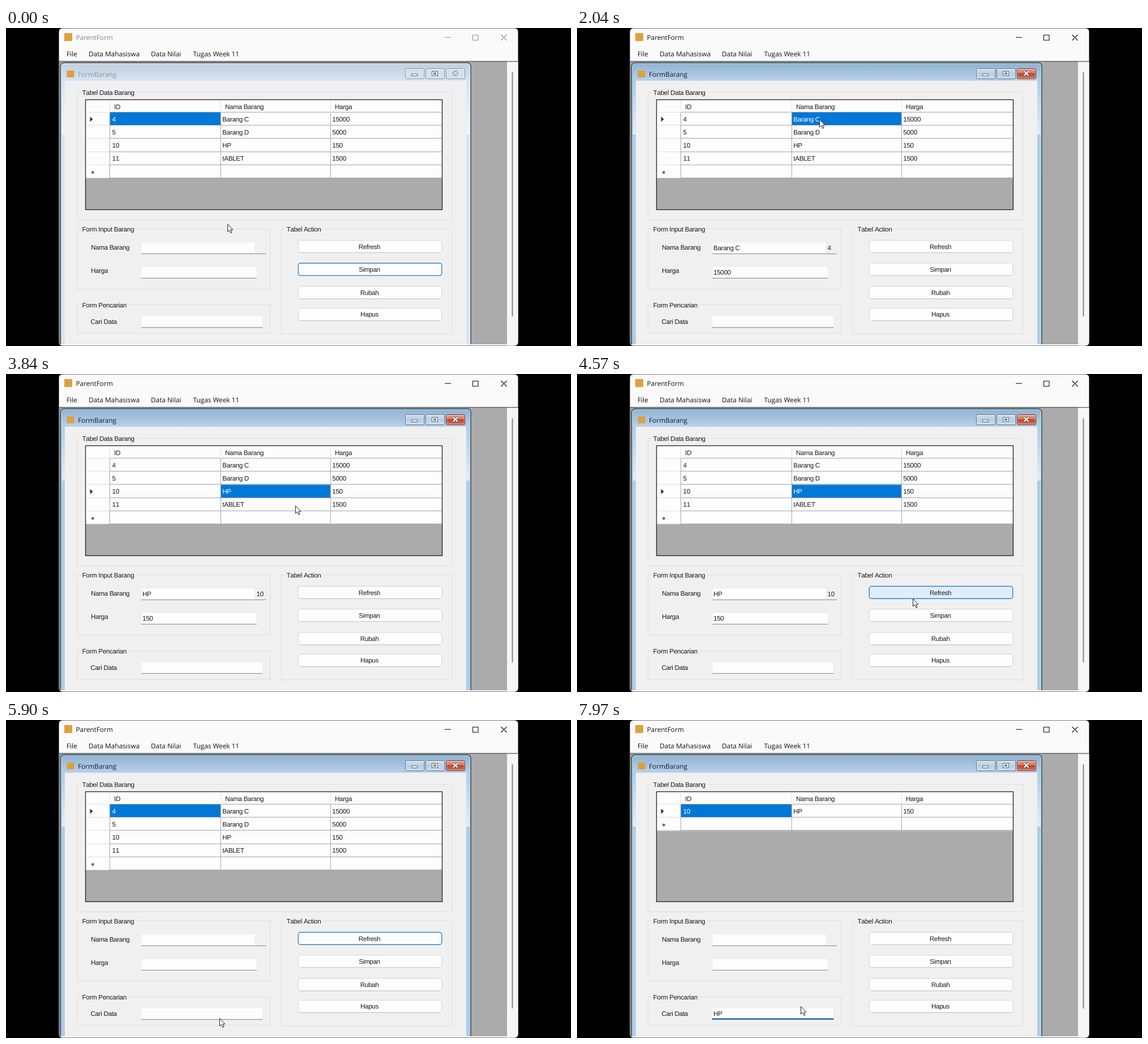
Write an HTML page that moves like this. It is 998x561 px and loops after 8 s.

```html
<!DOCTYPE html>
<html lang="id">
<head>
<meta charset="utf-8">
<style>
html, body { margin: 0; height: 100%; overflow: hidden; background: #000; }
svg { display: block; width: 100vw; height: 100vh; }
text { font: 11.6px "Liberation Sans", Arial, sans-serif; letter-spacing: -.3px; font-kerning: none; text-rendering: geometricPrecision; white-space: pre; }
.ui { font: 11.8px "Open Sans", sans-serif; letter-spacing: 0; }
</style>
</head>
<body>
<svg viewBox="0 0 998 561">
  <defs>
    <linearGradient id="active" x2="0" y2="1"><stop stop-color="#91b3d2"/><stop offset="1" stop-color="#b9d1ea"/></linearGradient>
    <linearGradient id="inactive" x2="0" y2="1"><stop stop-color="#bfd0de"/><stop offset="1" stop-color="#d7e4f2"/></linearGradient>
    <linearGradient id="sheen" x2="0" y2="1"><stop stop-color="#fff" stop-opacity="0"/><stop offset="1" stop-color="#fff" stop-opacity=".65"/></linearGradient>
    <linearGradient id="glass" x2="0" y2="1"><stop stop-color="#d3e2f1"/><stop offset=".5" stop-color="#b8cee4"/><stop offset="1" stop-color="#c9dcee"/></linearGradient>
    <linearGradient id="red" x2="0" y2="1"><stop stop-color="#e5a799"/><stop offset=".48" stop-color="#d0715c"/><stop offset=".5" stop-color="#bd4129"/><stop offset="1" stop-color="#d5785f"/></linearGradient>
    <clipPath id="window"><rect x="93.5" y=".5" width="811" height="560" rx="6"/></clipPath>
    <clipPath id="client"><rect x="93" y="58" width="792" height="500"/></clipPath>
  </defs>
  <g id="scene" clip-path="url(#window)"></g>
</svg>
<script>
const LOOP = 8000;
const ITEMS = [['4', 'Barang C', '15000'], ['5', 'Barang D', '5000'], ['10', 'HP', '150'], ['11', 'tABLET', '1500']];
const COLS = [183, 379, 573, 770];
const BUTTONS = [['Refresh', 374.5], ['Simpan', 414.8], ['Rubah', 456], ['Hapus', 494.3]];

// Selected row and column from each moment on
const PICKS = [[0, 0, 0], [1760, 0, 1], [2760, 1, 1], [3400, 2, 1], [4940, 0, 0]];
const FILTER_AT = 6940, SECOND_KEY_AT = 7570, SEARCH_FOCUS_AT = 6170;

// Pointer: time, x, y
const PATH = [
  [0, 391, 345.5], [940, 391, 345.5], [1370, 412, 225], [1440, 412, 225], [1740, 428, 161], [2340, 428, 161],
  [2700, 437, 184], [3140, 444, 186], [3270, 444, 186], [3380, 450, 206], [3560, 456, 208], [3840, 511, 232],
  [4070, 547, 292], [4100, 547, 292], [4570, 593, 396], [4820, 606, 387], [5340, 606, 387],
  [5900, 377, 526], [6140, 395, 505], [LOOP, 395, 505]
];

const clamp = v => Math.max(0, Math.min(1, v));
const ramp = (t, start, length) => clamp((t - start) / length);
const lastBefore = (list, t) => list.filter(e => e[0] <= t).pop();

const rect = (x, y, w, h, fill, more = '') => `<rect x="${x}" y="${y}" width="${w}" height="${h}" fill="${fill}" ${more}/>`;
const path = (d, stroke, width = 1, fill = 'none') => `<path d="${d}" stroke="${stroke}" stroke-width="${width}" fill="${fill}"/>`;
const text = (x, y, s, fill = '#1a1a1a', more = '') => `<text x="${x}" y="${y}" fill="${fill}" ${more}>${s}</text>`;
const uiText = (x, y, s, fill) => text(x, y, s, fill, 'class="ui"');

function pointer(t) {
  const i = PATH.findIndex(p => p[0] > t);
  const [t0, x0, y0] = PATH[i - 1], [t1, x1, y1] = PATH[i];
  const u = (t - t0) / (t1 - t0), k = u * u * (3 - 2 * u);
  const x = x0 + (x1 - x0) * k, y = y0 + (y1 - y0) * k;
  return `<g transform="translate(${x} ${y})">` +
    path('M.5 .5V14L3.6 11.1 5.8 16.2 8 15.2 5.8 10.3H9.8Z', '#222', 1, '#fff') + '</g>';
}

function parentFrame(active) {
  const ink = active ? '#111' : '#929292';
  return rect(93, 0, 812, 561, '#fafafa') +
    rect(103, 9, 14, 14, '#dfa03c') + uiText(123.5, 21, 'ParentForm', active ? '#111' : '#858585') +
    path('M775 16.5H786M824.5 12.5H834V21.5H824.5ZM874.5 12L884.5 22M884.5 12L874.5 22', ink, 1.1) +
    [['File', 107], ['Data Mahasiswa', 146], ['Data Nilai', 256], ['Tugas Week 11', 330.5]]
      .map(([s, x]) => uiText(x, 50, s, '#111')).join('') +
    rect(885, 60, 20, 501, '#f6f6f6') + rect(893.5, 78, 2, 431, '#858585', 'rx="1"') +
    rect(93, 58, 792, 500, '#ababab') + path('M93 59H905M94 59V558', '#6c6c6c', 1.6);
}

function childFrame(active) {
  const line = active ? '#5c7188' : '#8291a1';
  const captionButton = (x, fill, stroke) => rect(x + .5, 71.5, 33, 18, fill, `stroke="${stroke}" rx="2"`) +
    rect(x + 1.5, 72.5, 31, 16, 'none', 'stroke="#fff" stroke-opacity=".45" rx="1"');
  const glass = active ? 'url(#glass)' : '#d3e1ee';
  const cross = 'M790 76.5L797.5 83.5M797.5 76.5L790 83.5';
  return rect(96.5, 61.5, 724.5, 520, active ? '#b0cce8' : '#d7e4f2', 'stroke="#333c44" stroke-width="1.4" rx="6"') +
    rect(97.5, 62.5, 722.5, 31, `url(#${active ? 'active' : 'inactive'})`, 'rx="5"') +
    rect(98, 93, 6, 95, 'url(#sheen)') + rect(813, 93, 6, 95, 'url(#sheen)') +
    path('M98 561V67Q98 63 102 63H815Q819.6 63 819.6 67V561', active ? '#a5dcf0' : '#e8f0f6') +
    rect(107.5, 75, 13, 12, '#dfa03c') + uiText(127, 86, 'FormBarang', active ? '#15202b' : '#8d969e') +
    captionButton(705, glass, line) + captionButton(741, glass, line) +
    captionButton(777, active ? 'url(#red)' : glass, active ? '#69302a' : line) +
    rect(716.5, 81, 10, 3.5, '#fff', 'stroke="#59636e"') +
    rect(752.5, 76.5, 10, 7.5, '#fff', 'stroke="#59636e"') + rect(755.5, 79, 4, 2.5, '#9eb4ca', 'stroke="#59636e"') +
    path(cross, '#59636e', 4.2) + path(cross, '#fff', 2) +
    rect(104, 93, 709, 470, '#f0f0f0');
}

function group(x, y, w, h, title, titleWidth) {
  return rect(x + .5, y + .5, w, h, 'none', 'stroke="#dedee0"') +
    rect(x + 8, y - 3, titleWidth, 7, '#f0f0f0') + text(x + 9.5, y + 4.6, title);
}

function grid(rows, row, col) {
  const top = i => 149 + i * 23.2;
  const bottom = top(rows.length + 1);
  let s = rect(140.5, 126.5, 630, 194, '#ababab') + rect(141, 127, 629, bottom - 127, '#fdfdfd') +
    rect(COLS[col], top(row), COLS[col + 1] - COLS[col], 23, '#0078d7');
  for (let i = 0; i <= rows.length + 1; i++) {
    const y = Math.round(top(i)) - .5;
    s += path(`M142 ${y}H183`, '#dedee4') + path(`M183 ${y}H770`, '#a4a4a8');
  }
  for (const x of COLS.slice(0, 3)) s += path(`M${x + .3} 128V149`, '#dedede') + path(`M${x + .3} 149V${bottom}`, '#a4a4a8');
  s += rect(140.5, 126.5, 630, 194, 'none', 'stroke="#222" stroke-width="1.3"');
  ['ID', 'Nama Barang', 'Harga'].forEach((h, c) => s += text(COLS[c] + 8, 142.7, h));
  rows.forEach((cells, r) => cells.forEach((v, c) =>
    s += text(COLS[c] + (c ? 3.3 : 4.5), top(r) + 15.8, v, r === row && c === col ? '#fff' : '#1a1a1a')));
  const ay = top(row) + 12, sy = top(rows.length) + 13;
  return s + path(`M148.5 ${ay - 4.5}V${ay + 4.5}L153.5 ${ay}Z`, 'none', 0, '#333') +
    path(`M150.5 ${sy}H156M153.2 ${sy - 2.8}V${sy + 2.8}M151.3 ${sy - 2}L155.2 ${sy + 2}M155.2 ${sy - 2}L151.3 ${sy + 2}`, '#444');
}

function field(x, y, w, value, focus = 0, fill = '#fdfdfd') {
  return rect(x, y, w, 20, fill, 'stroke="#e8e8e8" stroke-width=".6"') +
    path(`M${x} ${y + 20.3}H${x + w}`, '#85857c') +
    (focus ? rect(x - .5, y + 18.3, w + 1, 2, '#0067c0', `opacity="${focus}"`) : '') +
    text(x + 2, y + 14, value);
}

function button(label, y, focus, hover) {
  const shape = (fill, more) => rect(516.3, y, 253.4, 21.8, fill, `rx="4" ${more}`);
  return shape('#fdfdfd', 'stroke="#d4d4d6"') + path(`M520 ${y + 21.8}H766`, '#c6c6ca') +
    (hover ? shape('#e0eef9', `opacity="${hover}"`) : '') +
    (focus || hover ? shape('none', `stroke="#2f88cb" stroke-width="1.4" opacity="${Math.max(focus, hover)}"`) : '') +
    text(642, y + 15, label, '#1a1a1a', 'text-anchor="middle"');
}

function scene(t) {
  const active = t >= 70;
  const [, row, col] = lastBefore(PICKS, t);
  const rows = t < FILTER_AT ? ITEMS : [ITEMS[2]];
  const [id, name, price] = col ? ITEMS[row] : ['', '', ''];
  const query = t < FILTER_AT ? '' : t < SECOND_KEY_AT ? 'H' : 'HP';
  const focus = {
    Simpan: 1 - ramp(t, 1760, 250),
    Refresh: ramp(t, 4880, 60) * (1 - ramp(t, SEARCH_FOCUS_AT, 270))
  };
  const hover = ramp(t, 4370, 170) * (1 - ramp(t, 5430, 200));

  return parentFrame(active) + '<g clip-path="url(#client)">' + childFrame(active) +
    group(125, 113, 662, 225, 'Tabel Data Barang', 98) +
    group(125, 354, 341, 106, 'Form Input Barang', 96) +
    group(125, 488, 341, 50, 'Form Pencarian', 82) +
    group(486, 354, 301, 185, 'Tabel Action', 67) +
    grid(rows, row, col) +
    text(150, 391, 'Nama Barang') + text(150, 432, 'Harga') + text(149.5, 522, 'Cari Data') +
    field(239, 378, 201, name) + field(440.5, 378, 18.5, id, 0, '#f0f0f0') +
    field(239, 421, 204, price) + field(239, 508, 214, query, ramp(t, SEARCH_FOCUS_AT, 60)) +
    BUTTONS.map(([label, y]) => button(label, y, focus[label] || 0, label === 'Refresh' ? hover : 0)).join('') +
    '</g>' + pointer(t);
}

const stage = document.getElementById('scene');
const start = performance.now();
function tick() {
  stage.innerHTML = scene((performance.now() - start) % LOOP);
  requestAnimationFrame(tick);
}
tick();
</script>
</body>
</html>
```
